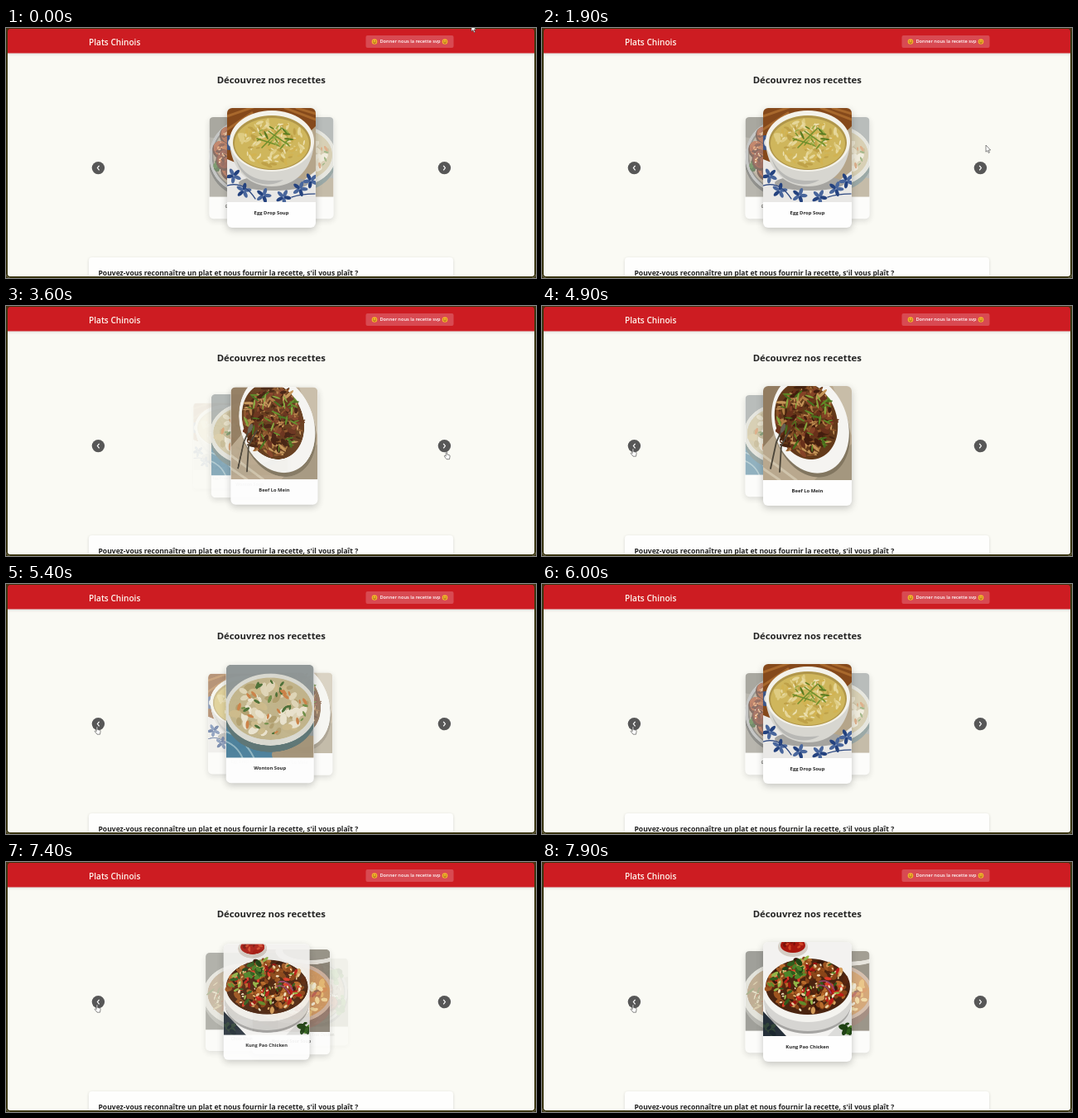
Recreate the animation shown at these times as an HTML page with a canvas. Size 640 by 303 pixels, loop 8000 ms.

```html
<!DOCTYPE html>
<html lang="fr">
<head>
<meta charset="utf-8">
<title>Plats Chinois</title>
<style>
html, body { margin: 0; width: 100%; height: 100%; overflow: hidden; background: #3a3512; }
#stage { position: relative; width: 640px; height: 303px; overflow: hidden; background: #fafaf4;
  font-family: "Open Sans", "Noto Sans", sans-serif; color: #232323; }
#stage > svg { position: absolute; left: 0; top: 0; }
#cards { position: absolute; inset: 0; isolation: isolate; }
.card { position: absolute; left: 267px; top: 97px; width: 107px; height: 145px; border-radius: 6px;
  overflow: hidden; background: #fefefe; box-shadow: 0 3px 9px rgba(40, 40, 40, .25);
  font-size: 5.9px; font-weight: 700; line-height: 27px; text-align: center; white-space: nowrap; }
.card canvas { display: block; width: 107px; height: 114px; }
#frame { position: absolute; inset: 0; border: 2px solid #3a3512; border-top-width: 1px;
  border-radius: 5px; box-shadow: 0 0 0 5px #3a3512; }
</style>
</head>
<body>
<div id="stage">
  <svg width="640" height="303" fill="#232323" font-weight="700">
    <defs>
      <filter id="soft" x="-10%" y="-30%" width="120%" height="160%">
        <feDropShadow dx="0" dy="1" stdDeviation="1.5" flood-color="#333" flood-opacity=".2"/>
      </filter>
      <g id="smile">
        <circle r="3.3" fill="#f3b32c"/>
        <path d="M-1.9-.7h1.1M.8-.7h1.1M-1.6 1Q0 2.6 1.6 1" fill="none" stroke="#6b3408" stroke-width=".7"/>
      </g>
    </defs>
    <rect width="640" height="30.5" fill="#cd1e22" filter="url(#soft)"/>
    <text x="100" y="20.5" font-size="10.1" font-weight="600" fill="#fff6ee">Plats Chinois</text>
    <rect x="434.5" y="9" width="106" height="15" rx="2" fill="#d84a52"/>
    <text x="488" y="18.4" font-size="5.65" font-weight="600" fill="#fff" text-anchor="middle">Donner nous la recette svp</text>
    <use href="#smile" x="445" y="16.5"/>
    <use href="#smile" x="530" y="16.5"/>
    <text x="320.3" y="67.4" font-size="11.35" text-anchor="middle">Découvrez nos recettes</text>
    <rect x="100" y="278" width="440" height="50" rx="4" fill="#fefefd" filter="url(#soft)"/>
    <text x="111.5" y="299.7" font-size="8.55">Pouvez-vous reconnaître un plat et nous fournir la recette, s'il vous plaît ?</text>
    <g fill="#575757"><circle cx="111.4" cy="169.6" r="7.7"/><circle cx="529.4" cy="169.6" r="7.7"/></g>
    <path d="M112.6 166.8l-2.2 2.8 2.2 2.8M528.2 166.8l2.2 2.8-2.2 2.8" fill="none" stroke="#fff" stroke-width="1.2"/>
  </svg>
  <div id="cards"></div>
  <div id="frame"></div>
  <svg width="640" height="303">
    <g id="cursor" fill="#fff" stroke="#3c3c3c" stroke-width=".6" stroke-linejoin="round">
      <path id="arrow" d="M0 0V8.2L1.9 6.5 3.2 9.4 4.5 8.8 3.2 6H5.7Z"/>
      <path id="hand" d="M2.2 1C2.2-.1 3.7-.1 3.7 1V4L6.2 4.6C7 4.8 7.2 5.3 7.1 6L6.5 9.7H3L.4 6.4C-.1 5.6.8 5 1.4 5.5L2.2 6.2Z"/>
    </g>
  </svg>
</div>
<script>
const $ = id => document.getElementById(id);
const TAU = Math.PI * 2, W = 107, H = 114;

// Drawing helpers bound to one dish picture
function brush(g, seed) {
  const rnd = () => (seed = (seed * 16807) % 2147483647) / 2147483647;
  const fill = color => { g.fillStyle = color; g.fillRect(0, 0, W, H); };
  const blob = (x, y, rx, ry, color, turn = 0) => {
    g.fillStyle = color;
    g.beginPath();
    g.ellipse(x, y, rx, ry, turn, 0, TAU);
    g.fill();
  };
  const line = (d, color, width) => {
    g.strokeStyle = color;
    g.lineWidth = width;
    g.lineCap = 'round';
    g.stroke(new Path2D(d));
  };
  const area = (d, color) => { g.fillStyle = color; g.fill(new Path2D(d)); };
  const scatter = (n, x, y, rx, ry, colors, size, flat = .6) => {
    for (let k = 0; k < n; k++) {
      const a = rnd() * TAU, r = Math.sqrt(rnd()), s = size * (.6 + .7 * rnd());
      blob(x + rx * r * Math.cos(a), y + ry * r * Math.sin(a), s, s * flat,
        colors[Math.floor(rnd() * colors.length)], rnd() * TAU);
    }
  };
  return { fill, blob, line, area, scatter };
}

const leaves = ['#2f5f1c', '#4c8429', '#1f4214'];

const dishes = [
  ['Chow Mein', ({ fill, blob, scatter }) => {
    fill('#66665f');
    blob(54, 66, 58, 50, '#8f8f88');
    blob(54, 62, 58, 46, '#d5d4cc');
    blob(54, 60, 51, 39, '#9a7c56');
    scatter(160, 54, 60, 48, 36, ['#9c8a5c', '#c4b080', '#75824c', '#a8613c', '#d6cba6'], 6, .2);
  }],
  ['Kung Pao Chicken', ({ fill, blob, line, area, scatter }) => {
    fill('#f3f2f0');
    area('M78 114L107 84V114Z', '#dcdcda');
    area('M0 84L28 114H0Z', '#26303a');
    scatter(10, 5, 106, 8, 8, ['#33463a', '#1c2830'], 4);
    blob(36, 6, 18, 12, '#d5cdc4');
    blob(36, 4, 15, 9, '#a9180f');
    scatter(14, 36, 4, 11, 6, ['#d04426', '#7c120a'], 2.5);
    blob(54, 76, 52, 35, '#a5a4a2');
    blob(54, 72, 53, 36, '#d6d5d2');
    blob(54, 58, 55, 39, '#f4f3ef');
    blob(54, 54, 51, 34, '#4a2410');
    scatter(150, 54, 53, 48, 32, ['#8a4518', '#b86a2a', '#58260e', '#d29a58', '#38180a', '#9e541f'], 5);
    scatter(34, 54, 52, 47, 30, ['#c01c18', '#98120f', '#de3a28'], 4, .45);
    scatter(36, 50, 48, 46, 29, ['#5f8c2c', '#93b648', '#2f5c1c'], 4, .4);
    scatter(55, 55, 54, 46, 29, ['#ecd0a0', '#d8a864', '#f4e4c4'], 2, .6);
    line('M68 48Q80 44 86 58M66 53Q76 50 82 62', '#96406b', 1.6);
    scatter(16, 38, 33, 13, 10, leaves, 4);
    scatter(10, 101, 104, 6, 6, leaves, 4);
  }],
  ['Hot and Sour Soup', ({ fill, blob, scatter }) => {
    fill('#5f5545');
    blob(78, 3, 46, 18, '#dbd7cf');
    blob(80, 2, 38, 13, '#6b6456');
    blob(54, 71, 57, 42, '#6f4a3a');
    blob(54, 60, 58, 42, '#bd9880');
    blob(54, 60, 53, 37, '#bd742c');
    scatter(85, 54, 60, 49, 33, ['#e0a444', '#c86a20', '#ecc878', '#a24a1a'], 5.5);
    scatter(28, 54, 60, 46, 30, ['#f3e6c8', '#e6cf9c'], 4.5);
    scatter(30, 54, 60, 46, 30, ['#a82a18', '#70341a', '#5c702c'], 4, .45);
  }],
  ['General Tsos Chicken', ({ fill, blob, scatter }) => {
    fill('#8d8a80');
    blob(10, 8, 30, 22, '#75736a');
    blob(98, 8, 24, 24, '#b5b2a8');
    blob(53, 60, 54, 54, '#4c4c4a');
    blob(53, 56, 53, 53, '#a3a5a6');
    blob(53, 56, 49, 49, '#5a5752');
    blob(53, 56, 47, 47, '#9c8c74');
    scatter(120, 53, 56, 44, 44, ['#ece6da', '#c2b59c', '#ddd3bf', '#6e5a40'], 2.8, .5);
    scatter(20, 84, 32, 13, 13, leaves, 4.5, .8);
    scatter(20, 92, 76, 9, 16, leaves, 4.5, .8);
    scatter(14, 15, 68, 8, 9, leaves, 4, .8);
    [[52, 17], [28, 26], [64, 34], [40, 42], [18, 46], [70, 52], [46, 60], [30, 76],
      [58, 80], [76, 74], [44, 94], [22, 60]].forEach(([x, y], k) => {
      blob(x, y + 2, 14.5, 12.5, '#3f1509', k);
      blob(x, y, 13, 10.5, ['#8a2e10', '#a03e16', '#74230d'][k % 3], k);
      scatter(9, x, y + 1, 9, 7, ['#b9551f', '#5c1a0a', '#8f3212', '#451408'], 4, .5);
      scatter(3, x - 3, y - 3, 5, 4, ['#e2a06a', '#d07c40'], 2.2, .5);
    });
    scatter(70, 48, 52, 36, 40, ['#f5e5bb'], 1, .7);
    scatter(18, 48, 46, 9, 9, leaves, 3.5, .7);
  }],
  ['Egg Drop Soup', ({ fill, blob, line, area, scatter }) => {
    fill('#85491b');
    line('M0 10L40-4M0 26L30 6M70 0L107 14M84 0L107 7', '#a8682c', 3);
    area('M88 40L107 22V114H60Z', '#b5a58a');
    area('M0 62L20 70 92 88 107 76V114H0Z', '#e9e8e6');
    blob(56, 91, 42, 9, '#a5a4a0');
    blob(3, 42, 8, 9, '#3d5687');
    blob(5, 42, 4, 5, '#dedfdd');
    area('M3 40C4 72 24 95 54 95S104 72 105 40Z', '#d7d6d0');
    area('M10 60C20 84 40 91 68 87 50 99 18 92 10 60Z', '#b8b8b5');
    blob(54, 40, 51, 37, '#f4f2ea');
    blob(54, 42, 47, 33, '#b0964a');
    blob(54, 43, 45, 31, '#cfb65c');
    scatter(110, 54, 43, 41, 27, ['#dfcc82', '#bfa148', '#e6d79a', '#d2b352'], 4, .4);
    scatter(30, 54, 43, 39, 25, ['#ece0b0'], 3, .3);
    scatter(20, 56, 36, 22, 14, ['#74922e', '#96ab43', '#587a20'], 4.5, .22);
    line('M42 48L66 24M50 28L70 42M36 37L58 44', '#708f2b', 1.5);
    [[8, 82], [20, 100], [44, 106], [88, 98], [101, 88], [68, 108]].forEach(([x, y]) => {
      for (let k = 0; k < 5; k++) {
        const a = k * TAU / 5 + x;
        blob(x + 5 * Math.cos(a), y + 5 * Math.sin(a), 4.5, 2.2, k % 2 ? '#24427f' : '#49669c', a);
      }
    });
    line('M0 94Q20 88 34 110M78 108Q90 104 106 104', '#2d4880', 1.3);
  }],
  ['Wonton Soup', ({ fill, blob, line, scatter }) => {
    fill('#8f9696');
    blob(8, 106, 52, 42, '#4c819c');
    line('M0 82Q22 90 34 114M0 94Q14 100 20 114', '#8fb4c0', 2);
    blob(94, 110, 38, 24, '#a39378');
    blob(54, 62, 56, 45, '#5d7575');
    blob(54, 55, 56, 44, '#dadad2');
    blob(54, 54, 51, 38, '#c2b58c');
    scatter(70, 54, 53, 45, 32, ['#e0d6b8', '#cdbb8c', '#ebe4cf', '#b2a070'], 6);
    scatter(34, 54, 53, 45, 32, ['#71904a', '#4d7138', '#cc8248'], 4, .4);
  }],
  ['Beef Lo Mein', ({ fill, blob, line, area, scatter }) => {
    fill('#b9a88e');
    area('M0 0H30L12 60 0 74Z', '#927c60');
    area('M84 0H107V60Z', '#c8bda8');
    area('M62 114L107 70V114Z', '#a4977f');
    line('M0 84L40 114M0 100L20 114', '#d0c4ac', 3);
    blob(58, 50, 45, 62, '#827660', -.32);
    blob(57, 46, 45, 61, '#f5f4f1', -.32);
    blob(52, 42, 37, 48, '#633a1a', -.32);
    scatter(190, 51, 42, 36, 43, ['#8a5228', '#b17c42', '#663618', '#c59558', '#46230f'], 6, .24);
    scatter(85, 51, 42, 34, 41, ['#431d0e', '#68301a', '#844226'], 4.5, .5);
    scatter(42, 52, 40, 35, 41, ['#5f8a26', '#84a63c', '#476f1c'], 5.5, .2);
    line('M9 100L16 68 24 50M20 104L22 72 32 54', '#4b4438', 1.8);
    blob(24, 51, 2.5, 6, '#666052', .4);
  }],
];

const cards = dishes.map(([name, paint], i) => {
  const card = document.createElement('div'), pic = document.createElement('canvas');
  card.className = 'card';
  pic.width = W * 2;
  pic.height = H * 2;
  const g = pic.getContext('2d');
  g.scale(2, 2);
  paint(brush(g, 4211 + 977 * i));
  card.append(pic, name);
  $('cards').append(card);
  return card;
});

const LOOP = 8000, STEP = 100, SLIDE = 500, FIRST = 4;
// [time, dish brought to the middle]
const clicks = [[2800, 5], [3300, 6], [5050, 5], [5450, 4], [6250, 3], [6640, 2], [7150, 1]];
// [time, x, y]
const path = [[0, 562, -4], [1000, 562, 13], [1800, 536, 142], [1900, 536, 142], [2200, 562, 156],
  [2600, 529, 176], [3800, 529, 176], [4500, 107, 172.5], [LOOP, 107, 172.5]];

const mix = (a, b, p) => a + (b - a) * p;
const clamp = (v, lo, hi) => Math.min(hi, Math.max(lo, v));
const smooth = p => p * p * (3 - 2 * p);

// The CSS "ease" curve
function ease(x) {
  if (x <= 0 || x >= 1) return clamp(x, 0, 1);
  let lo = 0, hi = 1, u;
  for (let k = 0; k < 20; k++) {
    u = (lo + hi) / 2;
    if (.75 * (1 - u) * u + u ** 3 < x) lo = u; else hi = u;
  }
  return .3 * (1 - u) ** 2 * u + 3 * (1 - u) * u * u + u ** 3;
}

// Slot of a dish: 0 middle, ±1 beside it, ±2 hidden; a click takes over a running slide
function slot(i, t) {
  const place = active => clamp(i - active, -2, 2);
  let to = place(FIRST), from = to, start = 0;
  for (const [time, active] of clicks) {
    if (t < time) break;
    from = mix(from, to, ease((time - start) / SLIDE));
    to = place(active);
    start = time;
  }
  return mix(from, to, ease((t - start) / SLIDE));
}

function draw(t) {
  cards.forEach((card, i) => {
    const s = slot(i, t), d = Math.abs(s);
    card.style.transform = `translateX(${29.7 * s}px) scale(${1 - .15 * d})`;
    card.style.opacity = d < 1 ? 1 - .4 * d : .6 * (2 - d);
    card.style.zIndex = Math.round(10 - 4 * d);
  });
  const k = path.findIndex(p => p[0] > t), [t0, x0, y0] = path[k - 1], [t1, x1, y1] = path[k];
  const p = smooth((t - t0) / (t1 - t0)), x = mix(x0, x1, p), y = mix(y0, y1, p);
  const over = [111.4, 529.4].some(cx => Math.hypot(x + 2.5 - cx, y - 169.6) < 8.5);
  $('cursor').setAttribute('transform', `translate(${x} ${y})`);
  $('hand').style.display = over ? '' : 'none';
  $('arrow').style.display = over ? 'none' : '';
}

const begin = performance.now();
function tick() {
  const t = (performance.now() - begin) % LOOP;
  draw(t - t % STEP);
  requestAnimationFrame(tick);
}
tick();
</script>
</body>
</html>
```
